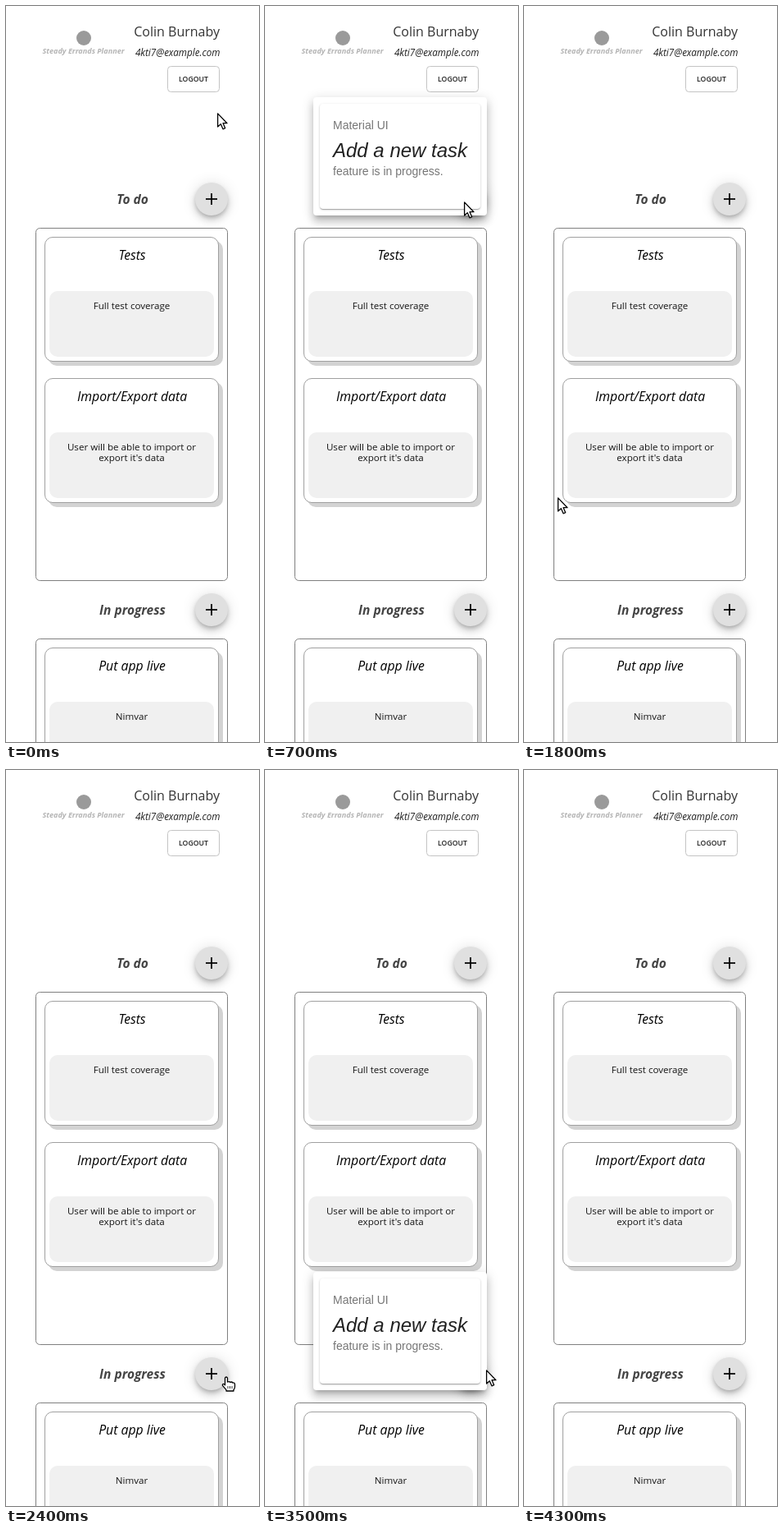
An HTML page for the animation above (5 s loop, 309x896 px).

```html
<!DOCTYPE html>
<html lang="en">
<head>
<meta charset="utf-8">
<title>Task board</title>
<style>
  html, body { margin: 0; width: 100%; height: 100%; overflow: hidden; background: #fff; }
  svg { position: absolute; left: 0; top: 0; overflow: visible; }
  text { font-family: "Open Sans", "Noto Sans", sans-serif; }
  .fab {
    position: absolute; left: 231px; width: 40px; height: 40px;
    border-radius: 50%; background: #e0e0e0;
    box-shadow: 0 3px 5px -1px rgba(0,0,0,.2), 0 6px 10px 0 rgba(0,0,0,.14), 0 1px 18px 0 rgba(0,0,0,.12);
  }
  .fab::before, .fab::after {
    content: ""; position: absolute; left: 13px; top: 19px;
    width: 14px; height: 2px; background: rgba(0,0,0,.87);
  }
  .fab::after { left: 19px; top: 13px; width: 2px; height: 14px; }
  #pop {
    position: absolute; left: 59px; width: 212px; height: 144px;
    border-radius: 4px; background: #fff; transform-origin: 100% 100%;
    box-shadow: 0 5px 5px -3px rgba(0,0,0,.2), 0 8px 10px 1px rgba(0,0,0,.14), 0 3px 14px 2px rgba(0,0,0,.12);
  }
  #pop div {
    position: absolute; left: 8px; top: 8px; width: 196px; height: 128px; border-radius: 4px;
    box-shadow: 0 1px 3px 0 rgba(0,0,0,.2), 0 1px 1px 0 rgba(0,0,0,.14), 0 2px 1px -1px rgba(0,0,0,.12);
  }
  #pop text { font: 14px "Liberation Sans", Arial, sans-serif; fill: rgba(0,0,0,.54); }
  #pop .head { font-size: 24px; font-style: italic; fill: rgba(0,0,0,.87); }
  #cursor path { stroke: #000; stroke-linejoin: round; }
</style>
</head>
<body>
<svg id="board" width="309" height="896"></svg>
<div class="fab" style="top:215px"></div>
<div class="fab" style="top:715px"></div>
<div id="pop">
  <div></div>
  <svg width="212" height="144">
    <text x="24" y="39">Material UI</text>
    <text class="head" x="24" y="73">Add a new task</text>
    <text x="24" y="95">feature is in progress.</text>
  </svg>
</div>
<svg id="cursor" width="309" height="896">
  <g id="arrow">
    <path fill="#fff" stroke-width="1.3" d="M.6 .9V17L4.3 13.7L7 19.8L9.7 18.7L7.1 12.7H12Z"/>
  </g>
  <g id="hand">
    <path fill="#fff" stroke-width="1.3" d="M-1.5 1.5a1.5 1.5 0 0 1 3 0V6Q4 5 4.8 6.3Q7 5.4 7.7 7Q10.5 6.5 10.5 9V12Q10.5 14 9 15.5V17H0V15.6L-4.6 10.2Q-4.8 8 -2.6 8.6L-1.5 9.8Z"/>
    <path fill="none" stroke-width=".8" d="M2 11v3M4.5 11v3M7 11v3"/>
  </g>
</svg>
<script>
const LOOP = 5000, STEP = 100, GROW = 260;
const $ = id => document.getElementById(id);

// ---- static board ----
const label = (str, x, y, size, { anchor = "middle", fill = "#000", weight = 400, style = "normal" } = {}) =>
  `<text x="${x}" y="${y}" font-size="${size}" text-anchor="${anchor}" fill="${fill}" font-weight="${weight}" font-style="${style}">${str}</text>`;

const box = (x, y, w, h, r, fill, stroke = "none") =>
  `<rect x="${x}" y="${y}" width="${w}" height="${h}" rx="${r}" fill="${fill}" stroke="${stroke}"/>`;

const card = (y, title, lines) =>
  box(52, y + 5, 213, 152, 10, "#d3d3d3") +
  box(47.5, y + .5, 212, 151, 9.5, "#fff", "#a0a0a0") +
  label(title, 154, y + 28, 15.8, { style: "italic" }) +
  box(53, y + 66, 201, 80, 10, "#f0f0f0") +
  lines.map((s, i) => label(s, 153.5, y + 88 + 13 * i, 11.6, { fill: "#151515" })).join("");

const column = (y, title) =>
  label(title, 154.5, y + 26, 15.5, { weight: 700, style: "italic", fill: "#444" }) +
  box(36.5, y + 55.5, 234, 429, 5, "none", "#808080");

$("board").innerHTML =
  `<circle cx="95" cy="39" r="9" fill="#9a9a9a"/>` +
  label("Steady Errands Planner", 94.5, 58, 9.1, { weight: 700, style: "italic", fill: "#b4b4b4" }) +
  label("Colin Burnaby", 261, 37, 16, { anchor: "end", fill: "#333" }) +
  label("4kti7@example.com", 261.5, 61, 11.7, { anchor: "end", style: "italic", fill: "#222" }) +
  box(197.5, 73.5, 63, 31, 4, "#fff", "#c4c4c4") +
  label("LOGOUT", 229, 92, 8.7, { weight: 600, fill: "#222" }) +
  column(215, "To do") +
  card(281, "Tests", ["Full test coverage"]) +
  card(453, "Import/Export data", ["User will be able to import or", "export it's data"]) +
  column(715, "In progress") +
  card(781, "Put app live", ["Nimvar"]);

// ---- motion ----
const clamp = v => Math.min(1, Math.max(0, v));

// cubic-bezier(.4, 0, .2, 1)
function ease(x) {
  if (x <= 0 || x >= 1) return clamp(x);
  let lo = 0, hi = 1;
  for (let i = 0; i < 24; i++) {
    const t = (lo + hi) / 2, u = 1 - t;
    if (1.2 * u * u * t + .6 * u * t * t + t * t * t < x) lo = t; else hi = t;
  }
  return lo * lo * (3 - 2 * lo);
}

const pops = [
  { top: 111, open: 434, close: 1390 },
  { top: 611, open: 2530, close: 3540 }
];
pops[1].open = 2800 - GROW;
const shownFrom = [0, 2800];

// time, x, y of the pointer's hot spot
const path = [
  [0, 258, 130], [100, 256, 150], [200, 250, 195], [300, 244, 232], [400, 243, 238],
  [1200, 243, 238], [1300, 182, 236], [1400, 128, 300], [1500, 85, 400], [1600, 62, 500],
  [1700, 46, 570], [1800, 41, 598], [1900, 60, 625], [2000, 110, 680], [2100, 175, 735],
  [2200, 231, 757], [2300, 262, 750], [2400, 269, 739], [2700, 269, 739], [2800, 270, 739],
  [3400, 270, 739], [3500, 270, 730], [3600, 268, 700], [3700, 240, 560], [3800, 200, 380],
  [3900, 158, 200], [4000, 126, 77], [4100, 111, 32], [4200, 99, 1], [4300, 90, -30]
];

function pointer(t) {
  const i = path.findIndex(p => p[0] > t);
  if (i < 0) return null;
  const [t0, x0, y0] = path[i - 1], [t1, x1, y1] = path[i];
  const k = (t - t0) / (t1 - t0);
  return [x0 + (x1 - x0) * k, y0 + (y1 - y0) * k];
}

function drawPop(t) {
  const i = t < 2500 ? 0 : 1, p = pops[i];
  const closing = t >= p.close;
  const age = t - (closing ? p.close : p.open);
  const fade = ease(age / GROW);
  const grow = ease((closing ? age - GROW / 3 : age) / (GROW * 2 / 3));
  const alpha = t < shownFrom[i] ? 0 : closing ? 1 - fade : fade;
  const s = .75 + .25 * (closing ? 1 - grow : grow);
  const el = $("pop").style;
  el.top = p.top + "px";
  el.opacity = alpha;
  el.visibility = alpha > 0 ? "visible" : "hidden";
  el.transform = s < 1 ? `scale(${s}, ${s * s})` : "none";
  return alpha;
}

function drawPointer(t, alpha) {
  const pos = pointer(t);
  $("cursor").style.display = pos ? "" : "none";
  if (!pos) return;
  const [x, y] = pos;
  const overFab = [235, 735].some(cy => Math.hypot(x - 251, y - cy) < 20);
  const hand = overFab && alpha < .5;
  $("hand").style.display = hand ? "" : "none";
  $("arrow").style.display = hand ? "none" : "";
  $(hand ? "hand" : "arrow").setAttribute("transform", `translate(${x} ${y})`);
}

function draw(now) {
  const t = Math.floor((now % LOOP) / STEP) * STEP;
  drawPointer(t, drawPop(t));
}

let start;
function tick(now) {
  start ??= now;
  draw(now - start);
  requestAnimationFrame(tick);
}
draw(0);
requestAnimationFrame(tick);
</script>
</body>
</html>
```
